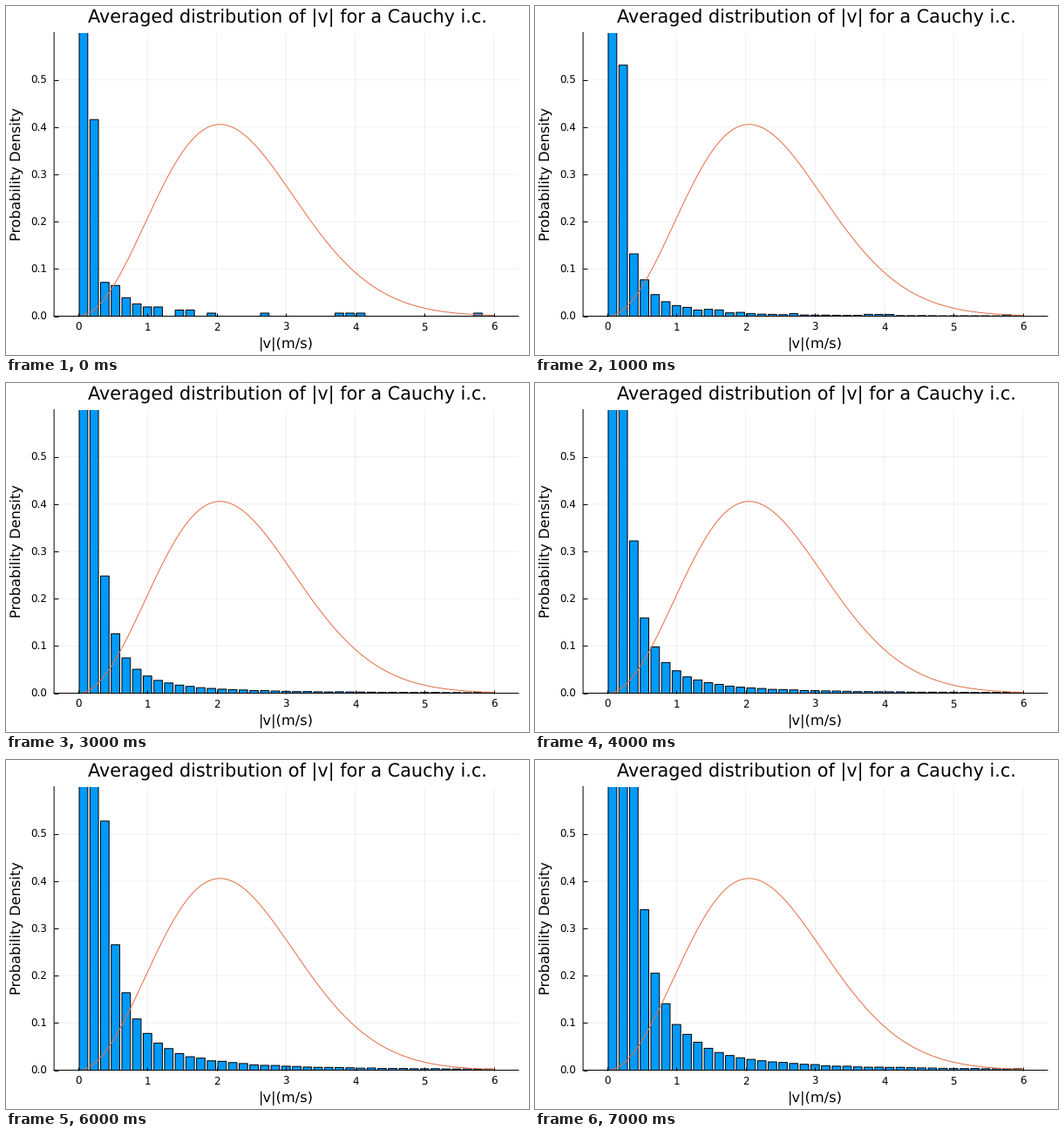
A matplotlib script for the animation above (8 s loop, 600 by 400 pixels).

```python
import numpy as np
import matplotlib.pyplot as plt
from matplotlib.animation import FuncAnimation

W, H = 600, 400
PX = 0.72                                   # points per pixel at 100 dpi
LEFT, RIGHT, TOP, BOTTOM = 55.1, 588, 30.5, 355.5
X0, UNIT = 82.8, 79.5                       # pixel of v = 0, pixels per m/s
YMAX = 0.6
BINS = 39
STEP = 6 / BINS
PARTICLE = 1 / (1000 * STEP)                # density of one particle in a bin
LONE = np.bincount([7, 9, 9, 10, 10, 12, 17, 24, 25, 26, 37], minlength=BINS)

plt.rcParams.update({"font.family": "DejaVu Sans", "text.hinting": "none",
                     "path.snap": False})


def histogram(t):
    """Cauchy tail 1/x^2 that gains weight as the particles speed up."""
    x = np.arange(BINS) + 0.5
    h = 0.724 * 1.285**t / x**2 * (1 + 25 * np.exp(-3 * x))
    h[2] *= 1 - 0.4 * 0.3**t                # the third bin fills up late
    if t == 0:                              # one sample: whole particles only
        h = np.where(x < 8, np.ceil(h / PARTICLE) * PARTICLE, 0)
    else:
        rng = np.random.default_rng(t)
        h *= 1 + 0.004 * x * rng.uniform(-1, 1, BINS)
    return h + LONE * PARTICLE * 0.35**t    # early outliers average out


def label(x, y, text, size, **kw):
    """Text with its baseline at pixel (x, y), counted from the top left."""
    kw = {"ha": "center", "va": "baseline", **kw}
    fig.text(x / W, 1 - y / H, text, fontsize=size * PX, **kw)


fig = plt.figure(figsize=(6, 4), dpi=100, facecolor="white")
ax = fig.add_axes([LEFT / W, 1 - BOTTOM / H, (RIGHT - LEFT) / W, (BOTTOM - TOP) / H])
ax.set_xlim((LEFT - X0) / UNIT, (RIGHT - X0) / UNIT)
ax.set_ylim(0, YMAX)
ax.set_axisbelow("line")
ax.spines[["top", "right"]].set_visible(False)
ax.spines[["left", "bottom"]].set_linewidth(PX)

xticks = np.arange(7)
yticks = np.arange(6) / 10
ax.set_xticks(xticks)
ax.set_yticks(yticks)
ax.tick_params(direction="in", length=4.5 * PX, width=PX,
               labelleft=False, labelbottom=False)

grid = dict(color="black", alpha=0.06, lw=PX, zorder=0)
for x in xticks:
    ax.axvline(x, **grid)
    label(X0 + UNIT * x, 371.9, str(x), 11.85)
for y in yticks:
    ax.axhline(y, **grid)
    base = BOTTOM - y / YMAX * (BOTTOM - TOP) + 4.6
    label(47.3, base, f"{y:.1f}", 11.85, ha="right")

label(322.8, 18.8, "Averaged distribution of |v| for a Cauchy i.c.", 20.8)
label(321.5, 391.8, "|v|(m/s)", 16.3)
label(16.3, 192.8, "Probability Density", 16.3, rotation=90, rotation_mode="anchor")

bars = ax.bar((np.arange(BINS) + 0.5) * STEP, histogram(0), width=0.8 * STEP,
              color="#009AFA", edgecolor="black", linewidth=PX, zorder=1)

# Maxwell speed distribution
a = 1.447
v = np.linspace(0, 6, 300)
pdf = np.sqrt(2 / np.pi) * v**2 / a**3 * np.exp(-v**2 / (2 * a**2))
ax.plot(v, pdf, color="#E36F47", lw=PX, zorder=2)

for artist in [*ax.spines.values(), *ax.lines, *bars]:
    artist.set_snap(False)
for tick in ax.xaxis.get_ticklines() + ax.yaxis.get_ticklines():
    tick.set_snap(False)


def draw(t):
    for bar, h in zip(bars, histogram(t)):
        bar.set_height(h)
    return bars.patches


anim = FuncAnimation(fig, draw, frames=8, interval=1000, repeat=True, repeat_delay=0)
plt.show()
```
